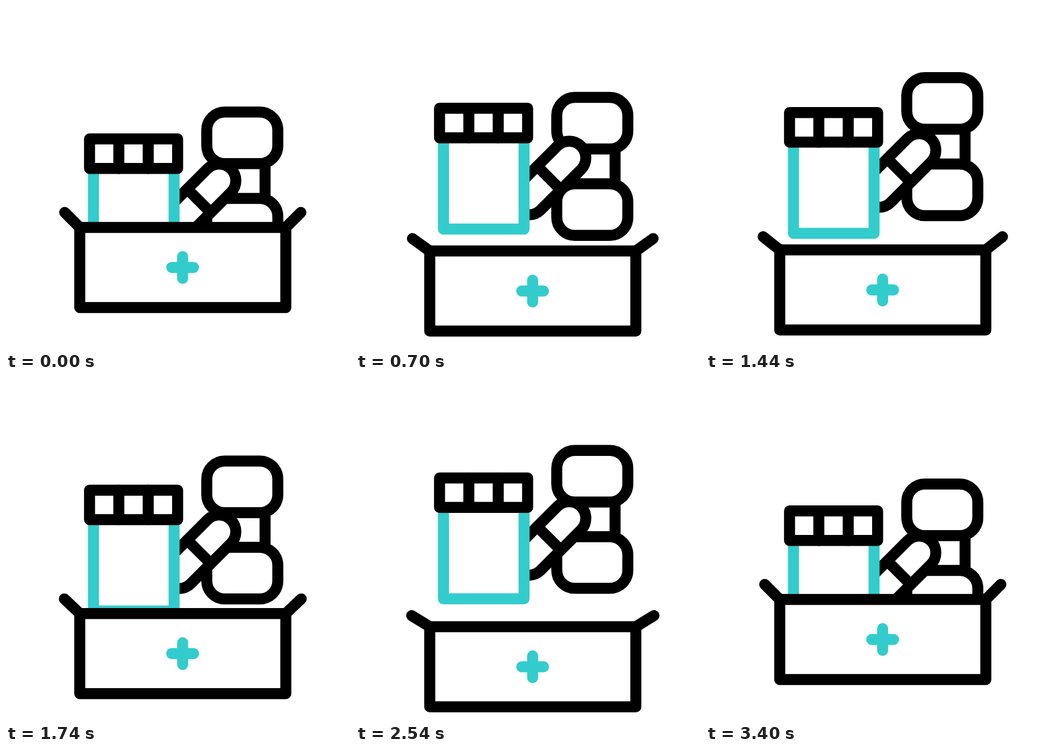
Animation of 640x640 px, one loop 3620 ms. Source, as an HTML page:

```html
<!DOCTYPE html>
<html lang="en">
<head>
<meta charset="utf-8">
<title>Medicine box</title>
<style>
  html, body { margin: 0; width: 100%; height: 100%; overflow: hidden; background: #fff; }
  svg { display: block; width: 100%; height: 100%; fill: #fff; stroke: #000; stroke-width: 20.5; stroke-linecap: round; stroke-linejoin: round; }
  .teal { stroke: #3cc; }
</style>
</head>
<body>
<svg viewBox="0 0 640 640">
  <g id="bottle">
    <path d="M397 293V358M482 293V358"/>
    <rect x="373.5" y="197.3" width="132.2" height="96" rx="33.5"/>
    <rect x="373.5" y="357.9" width="132.2" height="96" rx="33.5"/>
  </g>
  <g id="pill">
    <g transform="translate(359.1 362.4) rotate(-45)">
      <rect x="-84" y="-31" width="168" height="62" rx="31"/>
      <path d="M0-31V31"/>
    </g>
  </g>
  <g id="jar">
    <path class="teal" d="M162.7 302V472.1H312.7V302"/>
    <rect x="155.4" y="247.3" width="163.9" height="54.9"/>
    <path d="M209.9 247.3V302.2M264.6 247.3V302.2"/>
  </g>
  <g id="box">
    <rect x="137.2" y="412" width="383.4" height="149"/>
    <path id="leftFlap" d="M137.2 412l-28-28"/>
    <path id="rightFlap" d="M520.6 412l28-28"/>
    <path class="teal" d="M308.3 486.5H348.9M328.6 466.2V506.8"/>
  </g>
</svg>
<script>
const LOOP = 3620;
const part = id => document.getElementById(id);
const smooth = x => x * x * (3 - 2 * x);

// Eases through rest, high, dip, second high and rest, with equal steps from `start`.
function sway(t, start, step, [high, dip, second]) {
  const keys = [0, high, dip, second, 0];
  const p = Math.min(Math.max((t - start) / step, 0), 4);
  const i = Math.min(Math.floor(p), 3);
  return keys[i] + (keys[i + 1] - keys[i]) * smooth(p - i);
}

const shift = (id, y) => part(id).setAttribute('transform', `translate(0 ${y})`);
const turn = (id, angle, x) => part(id).setAttribute('transform', `rotate(${angle} ${x} 412)`);

function draw() {
  const t = performance.now() % LOOP;
  ['jar', 'pill', 'bottle'].forEach((id, i) =>
    shift(id, sway(t, 200 + 100 * i, 750, [-76.8, -38.4, -64])));
  shift('box', sway(t, 200, 800, [64, 25.6, 51.2]));
  const flap = sway(t, 200, 800, [13.5, 1.2, 13.5]);
  turn('leftFlap', -flap, 137.2);
  turn('rightFlap', flap, 520.6);
  requestAnimationFrame(draw);
}
draw();
</script>
</body>
</html>
```
